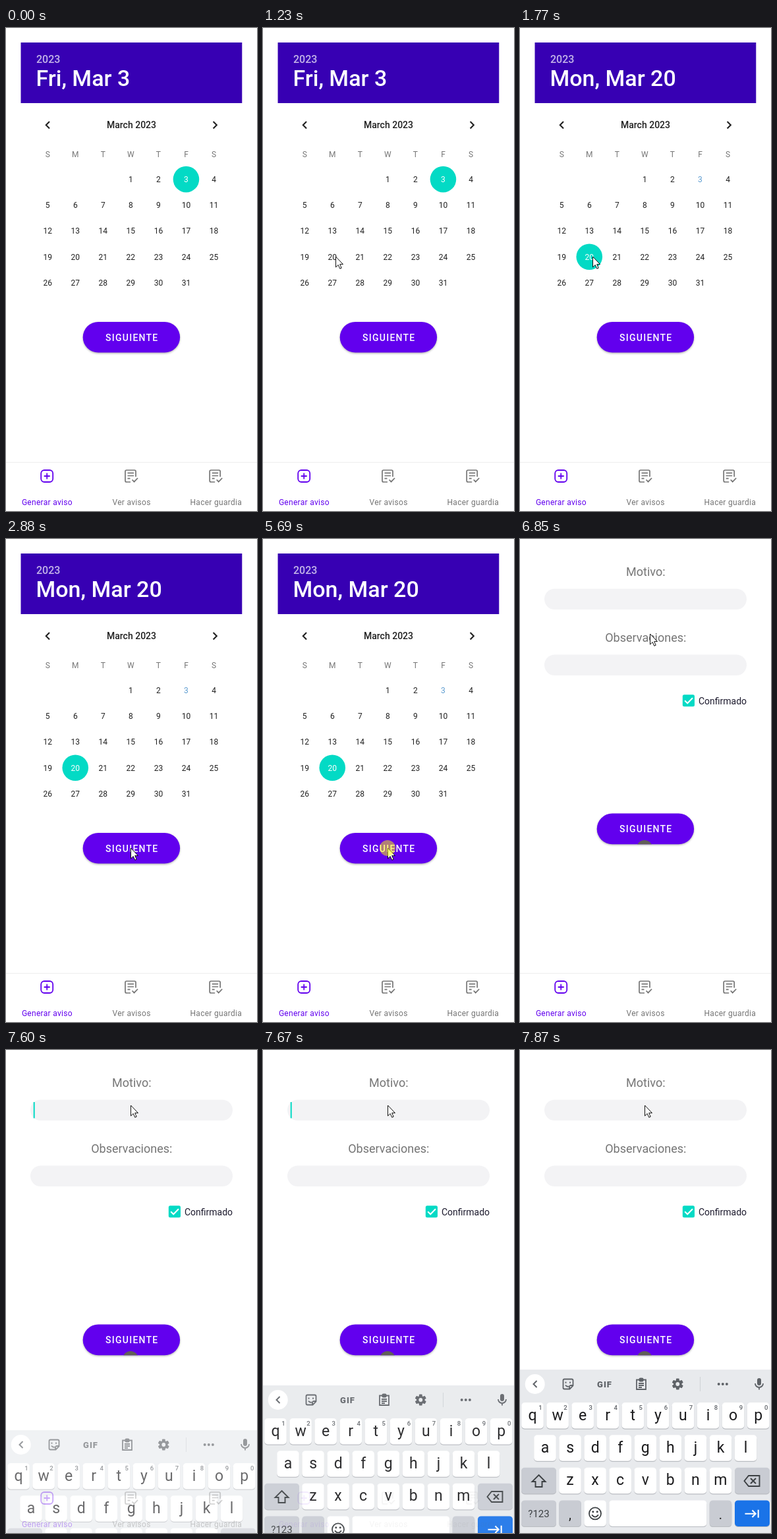
Recreate the animation shown at these times as an HTML page with a canvas. Size 381x733 px, loop 8000 ms.

```html
<!DOCTYPE html>
<html lang="es">
<head>
<meta charset="utf-8">
<style>
  html, body { margin: 0; width: 100%; height: 100%; overflow: hidden; background: #fff; }
  canvas { display: block; width: 381px; height: 733px; }
</style>
</head>
<body>
<canvas id="stage"></canvas>
<script>
const W = 381, H = 733, LOOP = 8000, STEP = 70;
const canvas = document.getElementById('stage');
const ctx = canvas.getContext('2d');
const ratio = window.devicePixelRatio || 1;
canvas.width = W * ratio;
canvas.height = H * ratio;

const PURPLE = '#6200ee', TEAL = '#03dac5', INK = '#212121', GREY = '#757575', KEY_GREY = '#5f6368';

function text(str, x, y, size, color, { weight = 400, align = 'center', spacing = 0 } = {}) {
  ctx.font = `${weight} ${size}px Roboto, sans-serif`;
  ctx.letterSpacing = spacing + 'px';
  ctx.textAlign = align;
  ctx.fillStyle = color;
  ctx.fillText(str, x, y);
  ctx.letterSpacing = '0px';
}

function box(x, y, w, h, r, color) {
  ctx.beginPath();
  ctx.roundRect(x, y, w, h, r);
  ctx.fillStyle = color;
  ctx.fill();
}

function disc(x, y, r, color) {
  ctx.beginPath();
  ctx.arc(x, y, r, 0, Math.PI * 2);
  ctx.fillStyle = color;
  ctx.fill();
}

// Strokes SVG path data placed at (x, y).
function icon(d, x, y, color, width = 1.8, fill = null) {
  ctx.save();
  ctx.translate(x, y);
  const path = new Path2D(d);
  if (fill) {
    ctx.fillStyle = fill;
    ctx.fill(path);
  }
  ctx.strokeStyle = color;
  ctx.lineWidth = width;
  ctx.stroke(path);
  ctx.restore();
}

function button(y) {
  ctx.save();
  ctx.shadowColor = 'rgba(0,0,0,.3)';
  ctx.shadowBlur = 3 * ratio;
  ctx.shadowOffsetY = 1.3 * ratio;
  box(116.7, y, 147.4, 46.6, 23.3, PURPLE);
  ctx.restore();
  text('SIGUIENTE', 191.3, y + 28.5, 14, '#fff', { weight: 500, spacing: 1.25 });
}

function calendar(selected) {
  ctx.fillStyle = '#3700b3';
  ctx.fillRect(22.5, 22, 335.8, 92);
  text('2023', 46, 53, 16, 'rgba(255,255,255,.7)', { weight: 500, align: 'left' });
  text(selected === 3 ? 'Fri, Mar 3' : 'Mon, Mar 20', 45.5, 88, 34, '#fff', { weight: 500, align: 'left' });

  text('March 2023', 190.5, 152, 14, INK, { weight: 500 });
  icon('M3-5.2L-2.2 0L3 5.2', 63, 147.2, INK, 2.1);
  icon('M-3-5.2L2.2 0L-3 5.2', 317.6, 147.2, INK, 2.1);

  const colX = i => 63.2 + 42.05 * i;
  [...'SMTWTFS'].forEach((c, i) => text(c, colX(i), 196.3, 12, GREY));
  for (let day = 1; day <= 31; day++) {
    const cell = day + 2;
    const x = colX(cell % 7), y = 229.6 + 39.2 * Math.floor(cell / 7);
    if (day === selected) disc(x, y, 19.8, TEAL);
    const color = day === selected ? '#fff' : day === 3 ? '#5b9bd0' : INK;
    text(day, x, y + 4.3, 12, color);
  }
  button(446);
}

function form(caretOn) {
  text('Motivo:', 190.8, 56, 18, GREY);
  text('Observaciones:', 190.8, 156, 18, GREY);
  box(37, 75.5, 307, 31.5, 15.7, '#f3f3f5');
  box(37, 175.5, 307, 31.5, 15.7, '#f3f3f5');
  if (caretOn) {
    ctx.fillStyle = TEAL;
    ctx.fillRect(41.7, 79, 2, 24.5);
  }
  box(246.8, 236.3, 18.2, 18, 2.5, TEAL);
  icon('M-5.8 0L-1.8 4L6 -4', 256, 245.3, '#fff', 2);
  text('Confirmado', 271, 251, 14, '#1d1b2e', { align: 'left' });
  button(416.6);
  // Dim trace of the click highlight left on the button's lower edge.
  ctx.save();
  ctx.beginPath();
  ctx.rect(170, 455, 40, 8.3);
  ctx.clip();
  disc(189, 469, 12, '#615f58');
  ctx.restore();
}

const PLUS = 'M-4-9H4A5 5 0 0 1 9-4V4A5 5 0 0 1 4 9H-4A5 5 0 0 1-9 4V-4A5 5 0 0 1-4-9ZM-4.5 0H4.5M0-4.5V4.5';
const CHECKLIST = 'M-1 9H-7A2 2 0 0 1-9 7V-7A2 2 0 0 1-7-9H5A2 2 0 0 1 7-7V1M-5.5-4.7H4M-5.5-.5H4M-5.5 3.7H-1.5M1.5 5.5L4.5 8.7L10 3';

function navBar(alpha) {
  ctx.save();
  ctx.globalAlpha = alpha;
  if (alpha === 1) {
    ctx.fillStyle = '#f1f1f1';
    ctx.fillRect(0, 658.6, W, 1.4);
  }
  icon(PLUS, 62.2, 680, PURPLE);
  icon(CHECKLIST, 190, 680, GREY, 1.7);
  icon(CHECKLIST, 318.2, 680, GREY, 1.7);
  ['Generar aviso', 'Ver avisos', 'Hacer guardia'].forEach((label, i) =>
    text(label, 62.4 + 128.2 * i, 724, 12, i ? GREY : PURPLE, { spacing: .3 }));
  ctx.restore();
}

function key(x, y, w, color = '#fff') {
  box(x, y + 1.2, w, 39.5, 5, '#b9bcc1');
  box(x, y, w, 39.5, 5, color);
}

function letters(row, firstX, y) {
  [...row].forEach((c, i) => {
    const x = firstX + 38.07 * i;
    key(x - 16.8, y, 33.6);
    text(c, x, y + 26.5, 23, '#1c1c1e');
  });
}

function toolbar() {
  disc(22.7, 22, 15, '#fff');
  icon('M2.5-5L-2.5 0L2.5 5', 23, 22, KEY_GREY, 2);
  icon('M-5.5-7.5H5.5A2 2 0 0 1 7.5-5.5V2.5L2.5 7.5H-5.5A2 2 0 0 1-7.5 5.5V-5.5A2 2 0 0 1-5.5-7.5ZM7.5 2H4A2 2 0 0 0 2 4V7.5M-4 1.5Q-2 4.5 1 3.5M-3.5-3.5V-1.2M3-3.5V-1.2', 73, 22, KEY_GREY);
  text('GIF', 128.5, 26.5, 13, KEY_GREY, { weight: 900, spacing: 1 });
  icon('M-7-6.5H7V8H-7ZM-4-1H4M-4 2H4M-4 5H1', 184, 22, KEY_GREY, 1.8);
  box(180.5, 12.5, 7, 6, 2, KEY_GREY);
  for (let i = 0; i < 6; i++) {
    ctx.save();
    ctx.translate(239.3, 22);
    ctx.rotate(i * Math.PI / 3);
    box(-2.4, -8.6, 4.8, 5, 1, KEY_GREY);
    ctx.restore();
  }
  icon('M4.6 0A4.6 4.6 0 1 1-4.6 0A4.6 4.6 0 1 1 4.6 0', 239.3, 22, KEY_GREY, 3.4);
  ctx.fillStyle = '#cfd2d6';
  ctx.fillRect(273, 11, 1, 22);
  for (const x of [301.7, 307.8, 313.9]) disc(x, 22, 2, KEY_GREY);
  box(360, 13, 6, 11, 3, KEY_GREY);
  icon('M-6 0A6 6 0 0 0 6 0M0 6V9.5', 363, 21, KEY_GREY, 1.8);
}

function keyboard(top) {
  ctx.save();
  ctx.translate(0, top);
  ctx.fillStyle = '#e8eaed';
  ctx.fillRect(0, 0, W, H);
  toolbar();

  letters('qwertyuiop', 19, 50);
  [...'1234567890'].forEach((c, i) =>
    text(c, 31 + 38.07 * i, 60.5, 9.5, KEY_GREY, { weight: 500 }));
  letters('asdfghjkl', 38, 99.3);
  letters('zxcvbnm', 76, 148.8);

  const side = '#c9ccd3', dark = '#3c4043';
  key(2, 148.8, 53, side);
  icon('M0-9L10 1H5V9H-5V1H-10Z', 28.5, 169, dark, 1.9);
  key(326, 148.8, 53, side);
  icon('M-12 0L-5.5-8H11V8H-5.5ZM-2.5-4L5.5 4M5.5-4L-2.5 4', 352.5, 169, dark, 1.9);

  const y = 198.4;
  key(2, y, 53, side);
  text('?123', 28.5, y + 26, 15, dark);
  key(59.3, y, 33.6, side);
  text(',', 76, y + 29, 20, INK);
  key(97.3, y, 33.6);
  icon('M9 0A9 9 0 1 1-9 0A9 9 0 1 1 9 0M-5 2Q0 8.5 5 2', 114, y + 20, dark, 1.8);
  disc(110.8, y + 17.4, 1.5, dark);
  disc(117.2, y + 17.4, 1.5, dark);
  key(135.3, y, 148);
  key(287.7, y, 33.6, side);
  text('.', 304.5, y + 29, 20, INK);
  key(326, y, 53, '#1a73e8');
  icon('M-11 0H5M0-5.2L5.2 0L0 5.2M9.2-6V6', 352.5, y + 20.3, '#fff', 2.1);
  ctx.restore();
}

// Pointer path: time, x, y.
const ROUTE = [
  [460, 330, 690], [600, 280, 595], [740, 230, 508], [880, 170, 440],
  [1020, 127, 388], [1160, 112, 352], [1230, 110, 347],
  [2250, 110, 347], [2390, 117, 360], [2600, 158, 425], [2740, 182, 460], [2880, 189, 469],
  [6360, 189, 469], [6430, 189, 462], [6570, 190, 380], [6710, 195, 235],
  [6850, 197, 144], [6990, 193, 100], [7130, 189, 84], [8000, 189, 84]
];

function pointerAt(t) {
  const i = ROUTE.findIndex(p => p[0] > t);
  const [t0, x0, y0] = ROUTE[i - 1], [t1, x1, y1] = ROUTE[i];
  const u = (t - t0) / (t1 - t0);
  return [x0 + (x1 - x0) * u, y0 + (y1 - y0) * u];
}

// The pointer advances in discrete ticks.
function tick(t) {
  for (const [from, to] of [[460, 1230], [2320, 2880], [6430, 7200]]) {
    if (t >= from && t < to) return from + Math.floor((t - from) / STEP) * STEP;
  }
  return t;
}

const CLICKS = [[1630, 1770], [5690, 5900], [7200, 7340]];

function pointer(t) {
  if (t < 460) return;
  const [x, y] = pointerAt(tick(t)).map(Math.round);
  icon('M.5.5V16.5L4.2 13L6.8 18.8L9.2 17.7L6.7 12.1H11.5Z', x, y - .5, '#111', 1, '#fff');
  if (CLICKS.some(([a, b]) => t >= a && t < b)) disc(x, y, 12, 'rgba(255,255,0,.5)');
}

function slidingKeyboard(t) {
  const [drop, opacity] = t < 7670 ? [92, .65] : t < 7740 ? [24, .92] : [0, 1];
  keyboard(485 + drop);
  if (opacity < 1) {
    ctx.fillStyle = `rgba(255,255,255,${1 - opacity})`;
    ctx.fillRect(0, 485 + drop, W, H);
    navBar(1 - opacity);
  }
}

function draw(t) {
  ctx.setTransform(ratio, 0, 0, ratio, 0, 0);
  ctx.fillStyle = '#fff';
  ctx.fillRect(0, 0, W, H);
  if (t < 5830) calendar(t < 1700 ? 3 : 20);
  else form(t >= 7270 && t < 7870);
  if (t < 7600) navBar(1);
  else slidingKeyboard(t);
  pointer(t);
}

const start = performance.now();
function loop() {
  draw((performance.now() - start) % LOOP);
  requestAnimationFrame(loop);
}
loop();
</script>
</body>
</html>
```
